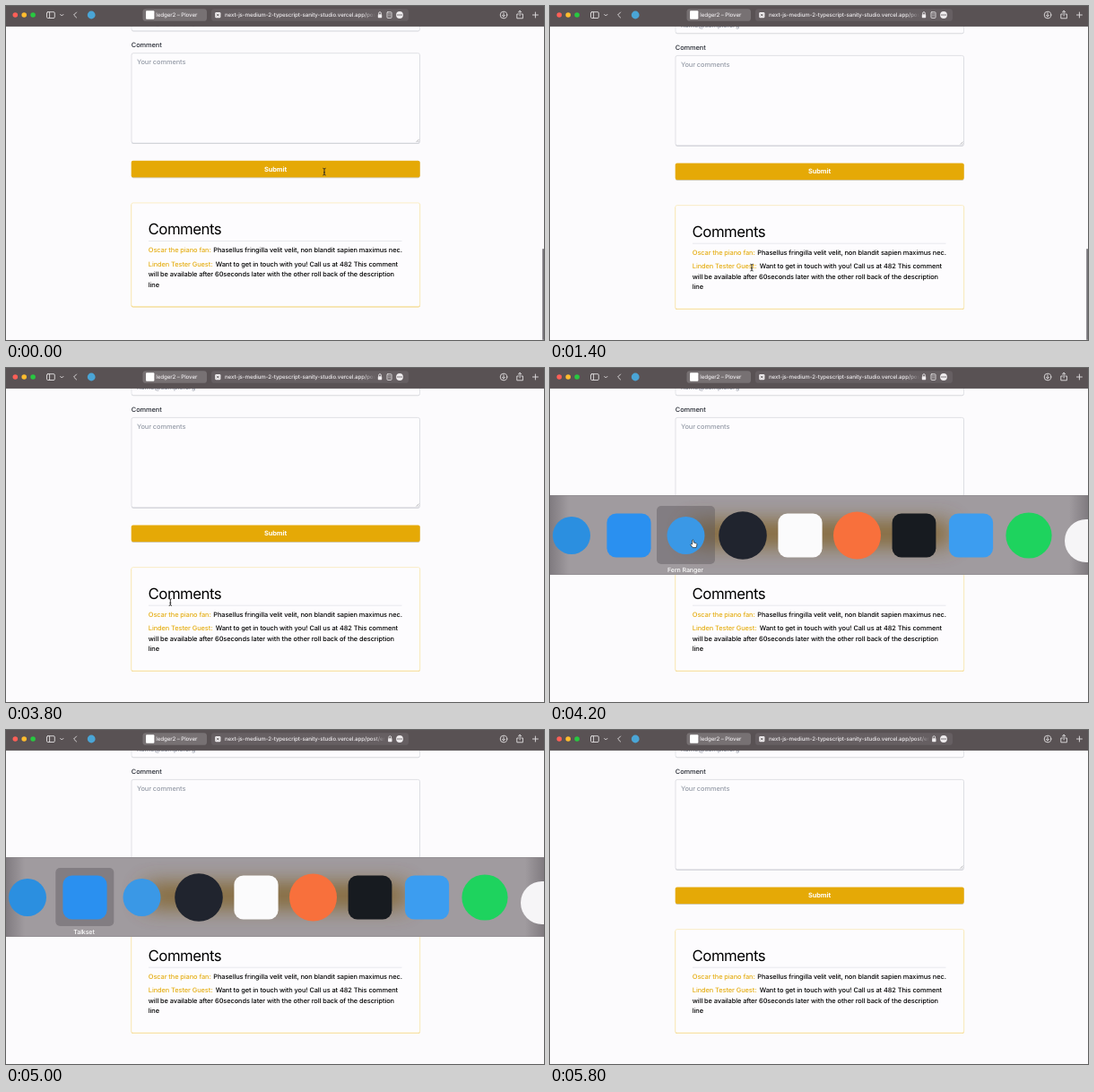
Animation of 600 by 373 pixels, one loop 5.9 s. Source, as an HTML page:

```html
<!DOCTYPE html>
<html lang="en">
<head>
<meta charset="utf-8">
<title>Comments page</title>
<style>
  html, body { margin: 0; width: 100%; height: 100%; overflow: hidden; background: #fcfbfd; }
  svg { display: block; width: 600px; height: 373px; }
  text { font: 500 7.4px Inter, "Open Sans", sans-serif; letter-spacing: -.075px; text-rendering: geometricPrecision; white-space: pre; }
  .bar text { font-size: 6.2px; letter-spacing: -.1px; fill: #efecee; }
  .line { fill: none; stroke: #e4e1e3; stroke-width: .9; stroke-linecap: round; stroke-linejoin: round; }
  .name { fill: #e5ae14; }
  .hint { fill: #969ca8; }
  .heading { font-weight: 400; font-size: 16.8px; letter-spacing: -.5px; }
  .caption { font-size: 7px; fill: #fff; text-anchor: middle; }
</style>
</head>
<body>
<svg viewBox="0 0 600 373" xmlns="http://www.w3.org/2000/svg">
  <defs>
    <filter id="soft" x="-5%" y="-10%" width="110%" height="120%"><feGaussianBlur stdDeviation=".7"/></filter>
    <filter id="glow" x="-20%" y="-150%" width="140%" height="400%"><feGaussianBlur stdDeviation="13"/></filter>
    <linearGradient id="fade">
      <stop offset="0" stop-color="#665f62" stop-opacity="0"/>
      <stop offset="1" stop-color="#665f62"/>
    </linearGradient>
    <linearGradient id="panel">
      <stop offset="0" stop-color="#807b80"/>
      <stop offset=".035" stop-color="#a09b9f"/>
      <stop offset=".965" stop-color="#a09b9f"/>
      <stop offset="1" stop-color="#807b80"/>
    </linearGradient>
    <clipPath id="panelClip"><rect y="142" width="600" height="89"/></clipPath>
    <clipPath id="addressClip"><rect x="242" y="2" height="16" id="addressBox"/></clipPath>
  </defs>

  <rect width="600" height="373" fill="#fcfbfd"/>

  <g id="page">
    <rect x="140" y="5" width="321.5" height="26.2" rx="2" fill="#bfc1c8" filter="url(#soft)" opacity=".6"/>
    <rect x="140" y="5" width="321.5" height="25.4" rx="2" fill="#fdfcfe" stroke="#d9dbe0" stroke-width=".6"/>
    <text x="146" y="23.6" class="hint">name@sample.org</text>

    <text x="139.8" y="48.6" fill="#262a33">Comment</text>
    <rect x="140" y="56" width="321.5" height="100.8" rx="2" fill="#bfc1c8" filter="url(#soft)" opacity=".7"/>
    <rect x="140" y="55.4" width="321.5" height="100.4" rx="2" fill="#fdfcfe" stroke="#d4d6dc" stroke-width=".7"/>
    <path d="M457.6 154.6l3-3m-1 3l1-1" stroke="#85858a" stroke-width=".6"/>
    <text x="146" y="68.2" class="hint">Your comments</text>

    <rect x="140" y="176" width="321.5" height="19" rx="2" fill="#b9a878" filter="url(#soft)" opacity=".6"/>
    <rect x="139.7" y="175.4" width="322" height="18.6" rx="2" fill="#e5a906"/>
    <text x="300.5" y="187.4" fill="#fff" text-anchor="middle" style="font-weight:700">Submit</text>

    <rect x="139.6" y="223.2" width="322.3" height="115.9" rx="2" fill="#edc144" filter="url(#soft)" opacity=".75"/>
    <rect x="139.8" y="222.6" width="321.9" height="115.6" rx="2" fill="#fdfcfe" stroke="#fae8b0" stroke-width=".7"/>
    <text x="158.6" y="258" class="heading">Comments</text>
    <path d="M159 265.2H441.5" stroke="#dfe0e5" stroke-width=".7"/>
    <text x="158.8" y="277.8" class="name">Oscar the piano fan:</text>
    <text x="231.3" y="277.8">Phasellus fringilla velit velit, non blandit sapien maximus nec.</text>
    <text x="158.8" y="293.4" class="name">Linden Tester Guest:</text>
    <text x="233.8" y="293.4">Want to get in touch with you! Call us at 482 This comment</text>
    <text x="158.8" y="304.9">will be available after 60seconds later with the other roll back of the description</text>
    <text x="158.8" y="316.4">line</text>
  </g>

  <rect id="scrollbar" x="598.2" y="271" width="1.8" height="102" rx=".8" fill="#77757a"/>

  <g class="bar">
    <rect width="600" height="22.8" fill="#595254"/>
    <path d="M0 22.6H600" stroke="#4b4547" stroke-width=".5"/>
    <circle cx="10.3" cy="10" r="2.8" fill="#ff5f57"/>
    <circle cx="20.2" cy="10" r="2.8" fill="#febc2e"/>
    <circle cx="30.1" cy="10" r="2.8" fill="#28c840"/>
    <g class="line">
      <rect x="45.5" y="6.7" width="8.8" height="6.8" rx="1.2"/>
      <path d="M48.6 6.9v6.4M60.7 9.4l1.6 1.6 1.6-1.6M78.6 7l-3 3 3 3"/>
      <circle cx="555" cy="10" r="3.8"/>
      <path d="M555 7.8v4m-1.5-1.5l1.5 1.5 1.5-1.5"/>
      <path d="M571.4 9h-1.6v4.8h6.6V9h-1.6M573.1 11V5.4m-1.7 1.5l1.7-1.6 1.7 1.6"/>
      <path d="M587.4 10h6m-3-3v6"/>
    </g>
    <circle cx="95.2" cy="10" r="4.4" fill="#4aa5d6"/>
    <rect x="152.5" y="3.2" width="71.5" height="13.6" rx="3.4" fill="#777173"/>
    <rect x="156" y="5.3" width="9.4" height="9.4" rx="1" fill="#fff"/>
    <text x="167.2" y="12.4">ledger2 – Plover</text>
    <rect x="229" y="3.2" width="220" height="13.6" rx="3.4" fill="#665f62"/>
    <rect x="233.2" y="7" width="6.2" height="6.2" rx="1.2" fill="#efecee"/>
    <path d="M235 8.8l2.6 2.6m0-2.6l-2.6 2.6" stroke="#4f494b" stroke-width=".8"/>
    <g clip-path="url(#addressClip)">
      <text x="244" y="12.4">next-js-medium-2-typescript-sanity-studio.vercel.app/post/en</text>
      <rect id="addressFade" y="4" width="14" height="12" fill="url(#fade)"/>
    </g>
    <g id="lock">
      <rect x="-2.2" y="9.3" width="4.4" height="3.9" rx=".6" fill="#efecee"/>
      <path d="M-1.3 9.4V8a1.3 1.3 0 0 1 2.6 0v1.4" class="line"/>
    </g>
    <g id="reader" class="line">
      <rect x="425" y="6.8" width="5" height="6.6" rx=".8"/>
      <path d="M426.4 8.9h2.2m-2.2 2h2.2" stroke-width=".6"/>
    </g>
    <circle cx="439" cy="10" r="3.9" fill="#efecee"/>
    <g fill="#4f494b"><circle cx="437" cy="10" r=".65"/><circle cx="439" cy="10" r=".65"/><circle cx="441" cy="10" r=".65"/></g>
  </g>

  <g id="switcher">
    <g clip-path="url(#panelClip)">
      <rect y="142" width="600" height="89" fill="url(#panel)"/>
      <rect x="155" y="174" width="292" height="22" fill="#775000" filter="url(#glow)" opacity=".85"/>
      <path d="M0 142.3H600M0 230.7H600" stroke="#8a858a" stroke-width=".6"/>
    </g>
    <rect id="selection" y="154" width="65" height="65" rx="5" fill="#5a5458" opacity=".42"/>
    <g id="apps"></g>
    <text id="caption" y="227.6" class="caption"></text>
  </g>

  <g id="pointer">
    <path id="beam" d="M-1.6-3.8Q0-3.6 0-2.6V2.8Q0 3.8-1.6 4M1.6-3.8Q0-3.6 0-2.6M0 2.8Q0 3.8 1.6 4M-.9.9H.9" fill="none" stroke="#222" stroke-width=".9"/>
    <path id="arrow" d="M0 0V7L1.6 5.6 2.7 8.1 3.9 7.6 2.8 5.1H5Z" fill="#111" stroke="#fff" stroke-width=".5"/>
    <path id="hand" d="M-1.4-3.6Q-.6-4.6 0-3.6L.4-1 3.2-.2Q4.2.4 3.8 2L3 4.6H-.8L-3.2 1.6Q-3-.1-1.4.9Z" fill="#fff" stroke="#222" stroke-width=".7"/>
  </g>
</svg>

<script>
const LOOP = 5900, STEP = 100;
const $ = id => document.getElementById(id);
const set = (id, attrs) => { for (const key in attrs) $(id).setAttribute(key, attrs[key]); };
const show = (id, on) => set(id, { visibility: on ? "inherit" : "hidden" });
const clamp = v => Math.max(0, Math.min(1, v));
const smooth = v => v * v * (3 - 2 * v);

// shape, centre x, centre y, half size, colour
const apps = [
  ["circle", 24, 187, 21, "#2b8fe0"],
  ["square", 88, 187, 24.6, "#2a90f0"],
  ["circle", 151.5, 187, 21, "#3a98e6"],
  ["circle", 215, 187, 26.8, "#20242e"],
  ["square", 279, 187, 24.6, "#fbfbfc"],
  ["circle", 342.5, 187, 26.5, "#f8703c"],
  ["square", 406, 187, 24.4, "#171b20"],
  ["square", 469.5, 187, 24.6, "#3c9df0"],
  ["circle", 534, 187, 25.6, "#1ed35e"],
  ["circle", 598, 193, 24, "#f6f5f7"]
];
$("apps").innerHTML = apps.map(([shape, x, y, r, fill]) => shape === "circle"
  ? `<circle cx="${x}" cy="${y}" r="${r}" fill="${fill}"/>`
  : `<rect x="${x - r}" y="${y - r}" width="${2 * r}" height="${2 * r}" rx="${r * .42}" fill="${fill}"/>`).join("");

// time, x, y
const pointerPath = [
  [0, 355, 185], [500, 229.7, 262.5], [800, 229, 275], [1300, 225, 292],
  [2400, 225, 291], [2900, 196, 297], [3600, 196, 297], [4100, 160, 196], [4600, 160, 196]
];

function pointerAt(t) {
  let i = 0;
  while (i < pointerPath.length - 2 && t >= pointerPath[i + 1][0]) i++;
  const [t0, x0, y0] = pointerPath[i], [t1, x1, y1] = pointerPath[i + 1];
  const k = smooth(clamp((t - t0) / (t1 - t0)));
  return [x0 + (x1 - x0) * k, y0 + (y1 - y0) * k];
}

function draw(t) {
  const scroll = -2.7 * (1 - smooth(clamp(t / 300)));
  set("page", { transform: `translate(0 ${scroll})` });
  set("scrollbar", { opacity: 1 - clamp((t - 2400) / 400) });

  const hasReader = t < 4700;
  const addressEnd = hasReader ? 412 : 423;
  set("addressBox", { width: addressEnd - 242 });
  set("addressFade", { x: addressEnd - 14 });
  set("lock", { transform: `translate(${hasReader ? 417 : 428.3} 0)` });
  show("reader", hasReader);

  show("switcher", t >= 3900 && t < 5200);
  const second = t >= 4500;
  set("selection", { x: second ? 55.3 : 119 });
  set("caption", { x: second ? 87 : 151 });
  $("caption").textContent = second ? "Talkset" : "Fern Ranger";

  const [x, y] = pointerAt(t);
  const kind = t >= 4000 ? "hand" : t >= 200 && t < 900 ? "arrow" : "beam";
  show("pointer", t < 4600);
  set("pointer", { transform: `translate(${x} ${y})` });
  for (const id of ["beam", "arrow", "hand"]) show(id, id === kind);
}

const start = performance.now();
function tick() {
  const t = (performance.now() - start) % LOOP;
  draw(Math.floor(t / STEP) * STEP);
  requestAnimationFrame(tick);
}
tick();
</script>
</body>
</html>
```
